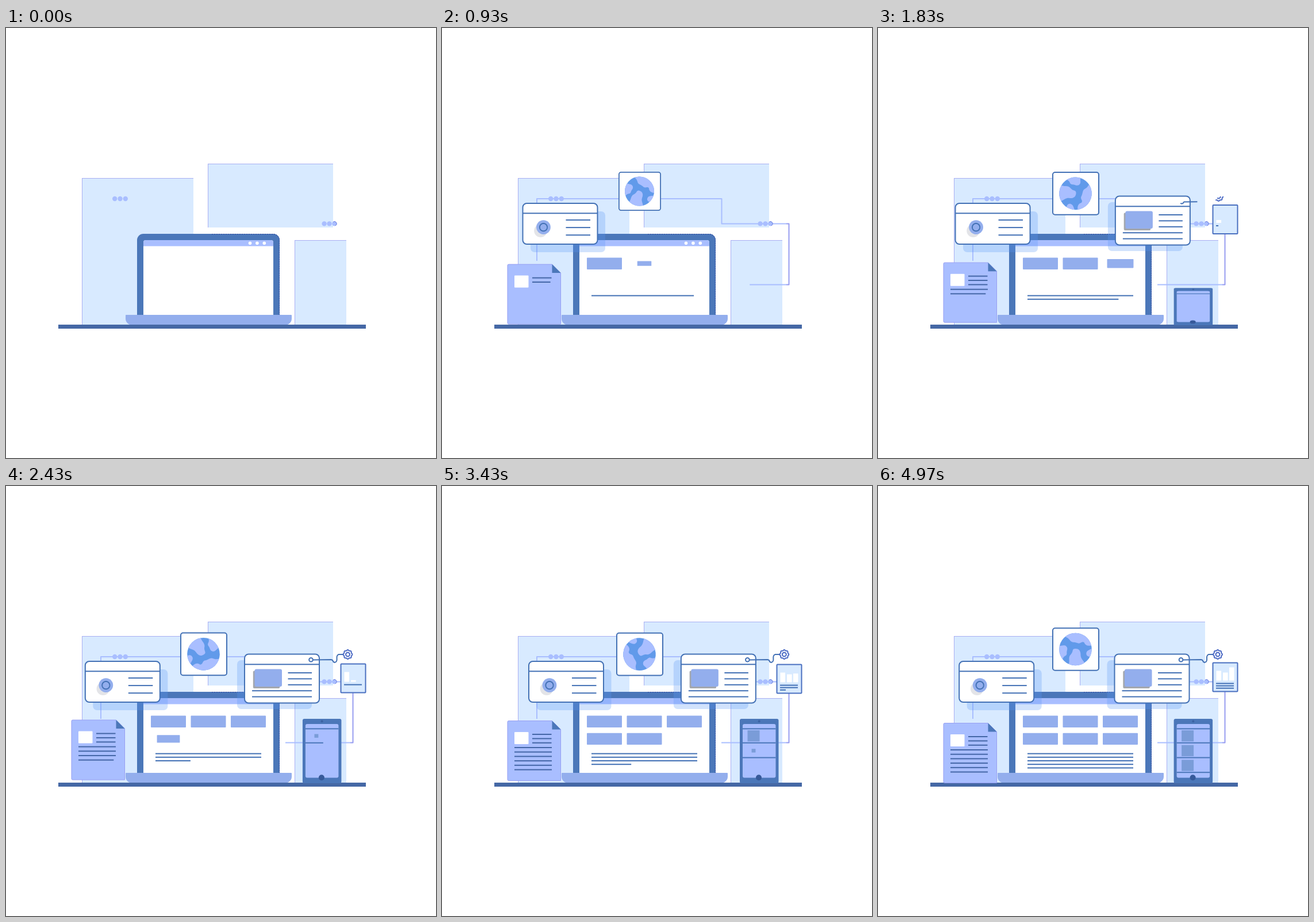
An HTML page with a canvas for the animation above (5030 ms loop, 748 by 748 pixels).

```html
<!DOCTYPE html>
<html lang="en">
<head>
<meta charset="utf-8">
<title>Connected devices</title>
<style>
  html, body { margin: 0; width: 100%; height: 100%; overflow: hidden; background: #fff; }
  canvas { display: block; width: 748px; height: 748px; }
</style>
</head>
<body>
<canvas id="stage" width="748" height="748"></canvas>
<script>
const LOOP = 5030;
const INK = '#4371b5', BEZEL = '#4b77b9', MID = '#93aeed', PALE = '#a9beff', SKY = '#d8eaff';
const c = document.getElementById('stage').getContext('2d');

// Timing helpers
const ramp = (t, start, length) => Math.min(1, Math.max(0, (t - start) / length));
const smooth = u => (1 - Math.cos(Math.PI * u)) / 2;
const linear = u => u;

function track(t, keys, ease = smooth) {
  if (t <= keys[0][0]) return keys[0][1];
  for (let i = 1; i < keys.length; i++) {
    const [t0, v0] = keys[i - 1], [t1, v1] = keys[i];
    if (t <= t1) return v0 + (v1 - v0) * ease((t - t0) / (t1 - t0));
  }
  return keys[keys.length - 1][1];
}

// Drawing helpers
function box(x, y, w, h, fill, r = 0, stroke) {
  c.beginPath();
  c.roundRect(x, y, w, h, r);
  if (fill) { c.fillStyle = fill; c.fill(); }
  if (stroke) { c.strokeStyle = stroke; c.lineWidth = 2; c.stroke(); }
}

function disc(x, y, r, fill) {
  c.beginPath();
  c.arc(x, y, r, 0, 7);
  c.fillStyle = fill;
  c.fill();
}

function rule(x, y, w, color = INK, weight = 2) {
  if (w <= 0) return;
  c.fillStyle = color;
  c.fillRect(x, y - weight / 2, w, weight);
}

function scaled(x, y, sx, sy, draw) {
  if (sx <= 0 || sy <= 0) return;
  c.save();
  c.translate(x, y);
  c.scale(sx, sy);
  c.translate(-x, -y);
  draw();
  c.restore();
}

function trimmed(points, amount, color, weight = 2) {
  if (amount <= 0) return;
  let total = 0;
  c.beginPath();
  points.forEach(([x, y], i) => {
    if (i) total += Math.hypot(x - points[i - 1][0], y - points[i - 1][1]);
    c.lineTo(x, y);
  });
  c.save();
  c.setLineDash(amount < 1 ? [total * amount, total * 2] : []);
  c.strokeStyle = color;
  c.lineWidth = weight;
  c.lineJoin = 'round';
  c.stroke();
  c.restore();
}

function ring(x, y, r, wobble = 0) {
  return Array.from({ length: 73 }, (_, i) => {
    const a = i / 72 * 2 * Math.PI, q = r + wobble * Math.cos(8 * a);
    return [x + q * Math.cos(a), y + q * Math.sin(a)];
  });
}

// Scene parts
function panel(x, y, w, h) {
  box(x, y, w, h, SKY);
  rule(x, y + .5, w, '#a9aff3', 1);
  c.fillRect(x, y, 1, h);
}

const wire = [[165, 405], [165, 297], [486.5, 297], [486.5, 340.5], [603.5, 340.5], [603.5, 446.5], [486, 446.5]];
const wireColor = c.createLinearGradient(598, 0, 600, 0);
wireColor.addColorStop(0, PALE);
wireColor.addColorStop(1, '#969cf0');

function backdrop(t) {
  panel(132, 261, 194, 256);
  panel(351, 236, 218, 111);
  panel(502, 369, 90, 148);
  trimmed(wire, ramp(t, 62, 925), wireColor);
  for (let i = 0; i < 3; i++) {
    disc(189.2 + i * 9.3, 297, 4.2, PALE);
    disc(553.6 + i * 8.9, 340.4, 4.2, PALE);
  }
  c.beginPath();
  c.arc(571.4, 340.4, 3.7, -2.2, 1.2);
  c.strokeStyle = '#6d7fdc';
  c.lineWidth = 1;
  c.stroke();
}

const blockStarts = [250, 770, 1530, 2170, 2950, 4095];
const typing = [[30, 0], [930, .967], [1830, 1.86], [2430, 2.33], [3430, 3.375], [4230, 4.18], [4960, 5]];

function laptop(t) {
  box(228, 358, 248, 142, BEZEL, [11, 11, 0, 0]);
  c.save();
  c.setLineDash([2, 2]);
  c.beginPath();
  c.moveTo(358, 358.5);
  c.lineTo(465, 358.5);
  c.arc(465, 369, 10.5, -Math.PI / 2, 0);
  c.lineTo(475.5, 499);
  c.strokeStyle = '#31459c';
  c.lineWidth = 1;
  c.stroke();
  c.restore();
  box(239, 369, 226, 131, '#fff', [4, 4, 0, 0]);
  box(239, 369, 226, 10.5, PALE, [4, 4, 0, 0]);
  for (let i = 0; i < 3; i++) disc(424.5 + i * 12.4, 374.3, 2.8, '#fff');

  blockStarts.forEach((start, i) => {
    const x = 252 + i % 3 * 69.5, y = i < 3 ? 399.5 : 429.7, s = ramp(t, start, 400);
    scaled(x + 30.5, y + 10.2, s, s, () => box(x, y, 61, 20.4, MID, 1));
  });
  const typed = track(t, typing, linear);
  for (let i = 0; i < 5; i++) rule(260, 465.6 + i * 6.2, 184 * ramp(typed, i, 1));

  box(208, 499, 289, 17.5, MID, [1, 1, 11, 11]);
  box(91, 516, 535, 7, '#4568a5');
}

function paper(t) {
  const dy = -2.75 * (1 - Math.cos(2 * Math.PI * Math.max(0, t - 110) / (LOOP - 110)));
  scaled(160, 517, 1, ramp(t, 33, 340), () => {
    c.save();
    c.translate(0, dy);
    c.beginPath();
    c.moveTo(116, 412.5);
    c.lineTo(191.5, 412.5);
    c.lineTo(206.5, 427.5);
    c.lineTo(206.5, 516.5);
    c.lineTo(116, 516.5);
    c.quadraticCurveTo(114, 516.5, 114, 514.5);
    c.lineTo(114, 414.5);
    c.quadraticCurveTo(114, 412.5, 116, 412.5);
    c.fillStyle = PALE;
    c.fill();
    c.strokeStyle = '#979ff2';
    c.lineWidth = 1;
    c.stroke();
    c.beginPath();
    c.moveTo(191.5, 412.5);
    c.lineTo(206.5, 427.5);
    c.lineTo(191.5, 427.5);
    c.fillStyle = BEZEL;
    c.fill();
    box(126, 432, 24.5, 21, '#fff', 1);
    for (let i = 0; i < 9; i++) {
      const [x, y, w] = i < 3 ? [157, 436 + i * 7.4, 33.5] : [126, 459 + (i - 3) * 7.7, 65];
      rule(x, y, w * ramp(t, 348 + i * 300, 300), '#4466a6');
    }
    c.restore();
  });
}

function card(x, y, h, headerY, shadowX, shadowY, shadowH) {
  box(x + shadowX, shadowY, 130, shadowH, 'rgba(90,150,245,.28)', 7);
  box(x + .5, y, 130, h, '#fff', 7, INK);
  rule(x + .5, headerY, 130);
}

function profileCard(t) {
  const x = track(t, [[900, 140], [2000, 133.7], [3400, 150.5], [LOOP, 140.7]]);
  const s = ramp(t, 330, 370);
  scaled(x + 65, 340.5, s, s, () => {
    card(x, 305, 71, 322.3, 14, 319, 71);
    disc(x + 31.5, 352.7, 11.3, '#e3e4e8');
    disc(x + 36.5, 346.6, 12.4, MID);
    trimmed(ring(x + 36.5, 346.6, 6.6), 1, INK);
    for (let i = 0; i < 3; i++) rule(x + 75.5, 334 + i * 13.1, 42.5);
  });
}

function articleCard(t) {
  const x = track(t, [[1100, 411], [3100, 415.7], [LOOP, 411]]);
  const s = ramp(t, 1100, 380);
  scaled(x + 65, 335, s, s, () => {
    card(x, 292.5, 85, 310.3, -12.5, 303, 85);
    box(x + 15.3, 321.5, 46.5, 30.5, '#a3a7ae', 2);
    box(x + 18, 318.5, 47.5, 30.5, MID, 3);
    for (let i = 0; i < 5; i++) {
      const left = i < 3 ? 76 : 13.5;
      rule(x + left, 325 + i * 10.4, 117.5 - left);
    }
  });

  const p = ramp(t, 1650, 500);
  const cable = [[119.5, 302.5], [151, 302], [153.5, 303], [155, 306], [157.5, 307], [160, 305.5],
    [161, 303], [161, 297], [162, 294.5], [164, 293], [172, 293]];
  trimmed(ring(x + 116, 302.3, 3.3), p, INK);
  trimmed(cable.map(([a, b]) => [x + a, b]), p, INK);
  trimmed(ring(x + 180, 293, 7.4, .6), p, '#4a69c4');
  trimmed(ring(x + 180, 293, 3.4), p, '#4a69c4');
}

const lands = [
  'M-13 30C-8 20-14 15-8 9C-3 4-7-1 0-1C7-1 9 4 9 9C9 16 12 17 17 25L10 32Z',
  'M-20-26C-17-19-14-22-10-16C-7-11-2-13 3-11C9-8 10-15 15-12C17-7 21-5 29-7L28-30L-10-32Z',
  'M-30-7C-24-4-20-9-16-5C-12-1-16 3-15 7C-15 13-20 10-22 17L-32 14Z',
  'M30-3C26 1 20 1 19 6C18 11 22 13 26 13Z'
].map(d => new Path2D(d));

function globe(t) {
  const y = track(t, [[1000, 284], [2950, 294], [4950, 284]]);
  const s = ramp(t, 570, 400);
  scaled(344, y, s, s, () => {
    box(304, y - 36.8, 80, 73.6, '#fff', 4, INK);
    c.save();
    c.translate(343.5, y);
    c.rotate((20 + .0842 * (t - 930)) * Math.PI / 180);
    disc(0, 0, 28.3, '#619aea');
    c.clip();
    c.fillStyle = PALE;
    lands.forEach(land => c.fill(land));
    c.restore();
  });
}

const bars = [[588.5, 17, 1700], [600, 14, 2340], [611, 23, 3130]];

function chartCard(t) {
  const y = 307.5 + track(t, [[1400, 0], [3150, 3.3], [4900, 0]]);
  const s = ramp(t, 1200, 350);
  scaled(604, y + 25, s, s, () => {
    box(582.5, y, 43, 50, SKY, 1, '#4a70c0');
    for (const [x, h, start] of bars) {
      const grown = h * ramp(t, start, 450);
      box(x, y + 31 - grown, 8.6, grown, '#fff');
    }
    const typed = track(t, [[1740, 0], [1830, .13], [2430, 1], [3430, 2.32], [3900, 3]], linear);
    for (let i = 0; i < 3; i++) rule(588, y + 36 + i * 4.1, 31 * ramp(typed, i, 1));
  });
}

const rows = [[2300, 2270], [3300, 3000], [4170, 3800]];

function phone(t) {
  const x = 514.6 + track(t, [[1700, 0], [3400, 3.4], [4970, 0]]);
  scaled(x, 517, 1, ramp(t, 1600, 400), () => {
    box(x, 405, 67.5, 112, BEZEL, 3);
    box(x + 5, 414, 57.5, 93.5, PALE, 3);
    disc(x + 33.7, 409.2, 2, '#3b62a3');
    rule(x + 5, 422.3, 57.5, BEZEL);
    rows.forEach(([square, divider], i) => {
      const y = 425 + i * 25.7, s = ramp(t, square, 400);
      scaled(x + 24, y + 9.7, s, s, () => box(x + 13.5, y, 21, 19.4, '#7a9cd8'));
      rule(x + 5, 446.8 + i * 25.7, 57.5 * ramp(t, divider, 300), BEZEL);
    });
    disc(x + 33, 507.3, 5, '#36599a');
  });
}

function draw(t) {
  c.fillStyle = '#fff';
  c.fillRect(0, 0, 748, 748);
  [backdrop, laptop, paper, profileCard, globe, articleCard, chartCard, phone].forEach(part => part(t));
}

const origin = performance.now();
function tick() {
  draw((performance.now() - origin) % LOOP);
  requestAnimationFrame(tick);
}
tick();
</script>
</body>
</html>
```
